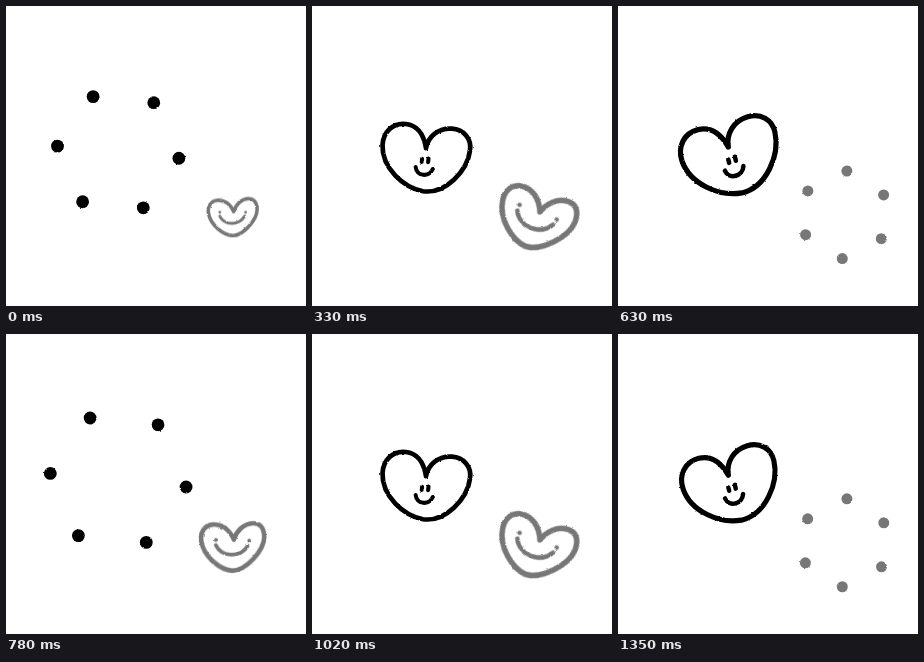
Write an HTML page that moves like this. It is 300 px wide and 300 px high and loops after 1.38 s.

```html
<!DOCTYPE html>
<html>
<head>
<meta charset="utf-8">
<style>
  html, body { margin: 0; width: 100%; height: 100%; overflow: hidden; background: #fff; }
  svg { display: block; width: 100%; height: 100%; }
  path { fill: none; stroke: currentColor; stroke-linecap: round; stroke-linejoin: round; }
  circle { fill: currentColor; }
</style>
</head>
<body>
<svg viewBox="0 0 300 300">
  <filter id="rough" filterUnits="userSpaceOnUse" x="0" y="0" width="300" height="300" color-interpolation-filters="sRGB">
    <feTurbulence type="fractalNoise" baseFrequency=".3" numOctaves="2" seed="4"/>
    <feDisplacementMap in="SourceGraphic" scale="2" xChannelSelector="R" yChannelSelector="G"/>
  </filter>
  <g filter="url(#rough)">
    <g id="black" color="#000">
      <g>
        <path stroke-width="5.200" d="M1 -11C-4 -29 -14 -35 -24 -35C-39 -35 -48 -23 -47 -9C-45 16 -19 35 3 36.500C28 37 49 9 49.500 -14C50 -27 40 -36 27 -35.500C12 -35 2 -24 1 -11"/>
        <path stroke-width="4.500" d="M-2 1V4.500M5 0V4M-8 11C-6 21 8 21 11 11"/>
      </g>
    </g>
    <g id="gray" color="#777">
      <g>
        <path stroke-width="5.400" d="M1 0C-5 -13 -15 -18 -24 -17C-34 -16 -39 -7 -37 3C-34 21 -14 36 0 36.500C16 36 37 12 36.500 -4C36 -15 31 -20 23 -19.500C12 -19 4 -10 1 0"/>
        <path stroke-width="4.400" d="M-20 1h.01M19 1h.01M-20 7C-13 21 9 22 17.500 7"/>
      </g>
    </g>
  </g>
</svg>
<script>
const HALF = 690, STEP = 30;

// swell to a peak at time mid and sink again
const swell = (u, peak, mid, width) => peak * (1 - ((u - mid) / width) ** 2);

function smooth(u, from, to) {
  const x = Math.min(1, Math.max(0, (u - from) / (to - from)));
  return x * x * (3 - 2 * x);
}

function makePart(id, pose) {
  const group = document.getElementById(id);
  const heart = group.firstElementChild;
  const dots = Array.from({ length: 6 }, () =>
    group.appendChild(document.createElementNS('http://www.w3.org/2000/svg', 'circle')));

  return u => {
    const p = pose(u);
    heart.style.display = p.showHeart ? '' : 'none';
    heart.setAttribute('transform', `translate(${p.heart}) rotate(${p.angle}) scale(${p.scale})`);
    dots.forEach((dot, i) => {
      const a = (p.turn + i * 60) * Math.PI / 180;
      dot.style.display = p.showHeart ? 'none' : '';
      dot.setAttribute('cx', p.ring[0] + p.radius * Math.cos(a));
      dot.setAttribute('cy', p.ring[1] + p.radius * Math.sin(a));
      dot.setAttribute('r', p.dotSize);
    });
  };
}

const parts = [
  makePart('black', u => ({
    showHeart: u >= 270, heart: [112, 152],
    scale: swell(u, 1.04, 530, 560), angle: 8 - 22 * smooth(u, 270, 630),
    ring: [112.2, 146.2], turn: 5.7, radius: swell(u, 71, 190, 506), dotSize: 6.4
  })),
  makePart('gray', u => ({
    showHeart: u < 480, heart: [227, 205.5],
    scale: swell(u, 1.03, 290, 484), angle: 24 * smooth(u, 40, 400),
    ring: [226.6, 208.8], turn: 33, radius: swell(u, 44, 660, 430), dotSize: 5.5
  }))
];

function frame() {
  const u = Math.floor(performance.now() / STEP + .1) * STEP % HALF;
  parts.forEach(draw => draw(u));
  requestAnimationFrame(frame);
}
frame();
</script>
</body>
</html>
```
